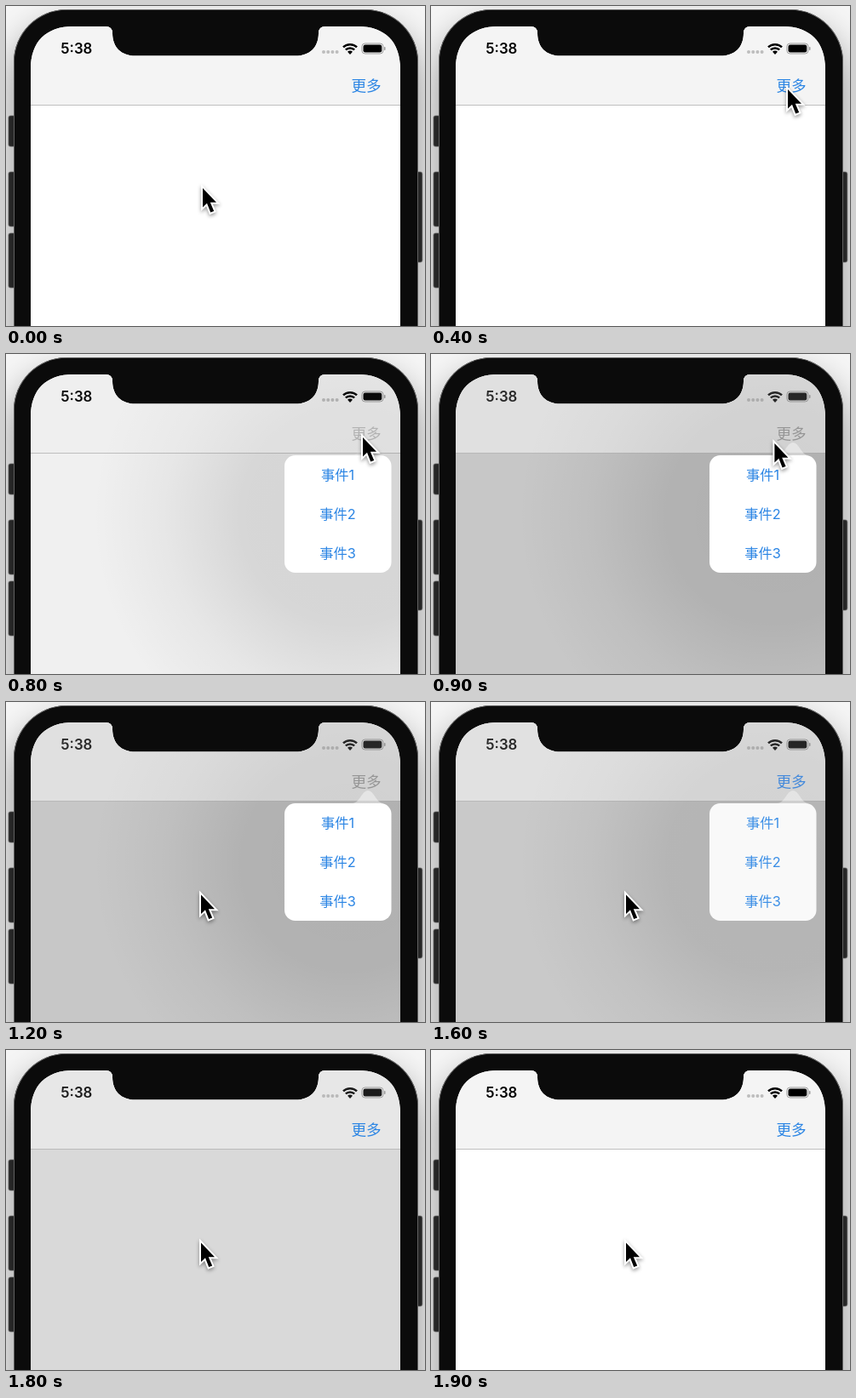
An HTML page with a canvas that plays this animation: 492x376 px, repeating every 2 s.

```html
<!DOCTYPE html>
<html lang="zh-CN">
<head>
<meta charset="utf-8">
<title>Popover menu</title>
<style>
html, body { margin: 0; width: 100%; height: 100%; overflow: hidden; background: #f4f4f4; }
canvas { display: block; }
</style>
</head>
<body>
<canvas id="stage" width="492" height="376"></canvas>
<script>
const ctx = document.getElementById('stage').getContext('2d');
const LOOP = 2000, STEP = 100;
const FONT = 'Inter, "Noto Sans CJK SC", "Noto Sans CJK", sans-serif';
const BLUE = '#2b85e4';

// Each track holds [start ms, value]; values change in hard steps.
const dimTrack = [[0, 0], [800, .27], [900, 1], [1600, .97], [1700, .87], [1800, .68], [1900, 0]];
const menuTrack = [[0, 0], [800, 1], [1600, .92], [1700, .45], [1800, 0]];
const buttonTrack = [[0, BLUE], [700, '#c3daf2'], [800, '#b2b2b2'], [900, '#959595'],
  [1600, '#4389db'], [1700, '#3687e0'], [1800, BLUE]];
const cursorTrack = [[0, [231, 214]], [200, [262, 193]], [300, [368, 126]], [400, [419, 98]],
  [900, [403.4, 105]], [1000, [343, 146]], [1100, [269, 200]], [1200, [229, 226.5]]];

const valueAt = (track, t) => track.reduce((v, key) => t >= key[0] ? key[1] : v, track[0][1]);

function box(x, y, w, h, r, color) {
  ctx.beginPath();
  ctx.roundRect(x, y, w, h, r);
  ctx.fillStyle = color;
  ctx.fill();
}

function rimmedBox(x, y, w, h, r, color) {
  box(x, y, w, h, r, '#777');
  box(x + .8, y + .8, w - 1.6, h - 1.6, r - .8, color);
}

function rect(x, y, w, h, color) {
  ctx.fillStyle = color;
  ctx.fillRect(x, y, w, h);
}

function label(text, x, y, size, color, weight = 400, align = 'center') {
  ctx.font = `${weight} ${size}px ${FONT}`;
  ctx.textAlign = align;
  ctx.fillStyle = color;
  ctx.fillText(text, x, y);
}

function drawDevice() {
  rect(0, 0, 492, 376, '#f6f6f6');
  ctx.save();
  ctx.shadowColor = 'rgba(0,0,0,.42)';
  ctx.shadowBlur = 44;
  ctx.shadowOffsetY = 22;
  box(9, 4, 475, 520, 62, '#0b0b0b');
  ctx.restore();
  for (const [x, y, h] of [[2.5, 128.5, 37], [2.5, 194.5, 65], [2.5, 266.5, 65], [480, 194.5, 107]])
    rimmedBox(x, y, 9.3, h, 3, '#262626');
  rimmedBox(9, 4, 475, 520, 62, '#0b0b0b');
}

function screenPath() {
  ctx.beginPath();
  ctx.moveTo(29, 376);
  ctx.lineTo(29, 74);
  ctx.bezierCurveTo(29, 42, 47, 24, 79, 24);
  ctx.lineTo(117, 24);
  ctx.quadraticCurveTo(125, 24, 125, 32);
  ctx.bezierCurveTo(125, 49, 136, 58.6, 152, 58.6);
  ctx.lineTo(340, 58.6);
  ctx.bezierCurveTo(356, 58.6, 367, 49, 367, 32);
  ctx.quadraticCurveTo(367, 24, 375, 24);
  ctx.lineTo(413, 24);
  ctx.bezierCurveTo(445, 24, 463, 42, 463, 74);
  ctx.lineTo(463, 376);
  ctx.closePath();
}

function drawWifi() {
  ctx.save();
  ctx.beginPath();
  ctx.moveTo(404, 57);
  ctx.lineTo(392, 44);
  ctx.lineTo(392, 38);
  ctx.lineTo(416, 38);
  ctx.lineTo(416, 44);
  ctx.closePath();
  ctx.clip();
  ctx.strokeStyle = ctx.fillStyle = '#000';
  ctx.lineWidth = 2.5;
  for (const r of [11.8, 7.6]) {
    ctx.beginPath();
    ctx.arc(404, 57, r, Math.PI, 0);
    ctx.stroke();
  }
  ctx.beginPath();
  ctx.arc(404, 57, 4.4, Math.PI, 0);
  ctx.fill();
  ctx.restore();
}

function drawStatus() {
  label('5:38', 64.3, 56.4, 16.8, '#000', 600, 'left');
  for (let i = 0; i < 4; i++) box(371 + i * 5.2, 52, 4, 4, 2, '#bdbdbd');
  drawWifi();
  ctx.beginPath();
  ctx.roundRect(417.9, 44, 25, 12, 3.6);
  ctx.strokeStyle = '#9b9b9b';
  ctx.lineWidth = 1;
  ctx.stroke();
  box(419.5, 45.6, 21.8, 8.8, 2.2, '#000');
  box(444, 48, 1.5, 4, 1, '#9b9b9b');
}

function drawShade(dim, menu) {
  rect(29, 24, 434, 93, `rgba(165,165,165,${.25 * dim})`);
  rect(29, 117, 434, 259, `rgba(0,0,0,${.22 * dim})`);
  if (!menu) return;
  const glow = ctx.createRadialGradient(402, 190, 0, 402, 190, 300);
  glow.addColorStop(0, `rgba(0,0,0,${.115 * menu})`);
  glow.addColorStop(.42, `rgba(0,0,0,${.105 * menu})`);
  glow.addColorStop(.72, `rgba(0,0,0,${.04 * menu})`);
  glow.addColorStop(1, 'rgba(0,0,0,0)');
  ctx.globalAlpha = .6;
  rect(29, 24, 434, 93, glow);
  ctx.globalAlpha = 1;
  rect(29, 117, 434, 259, glow);
}

function drawMenu(dim, menu) {
  ctx.save();
  ctx.globalAlpha = menu;
  ctx.beginPath();
  ctx.moveTo(407, 119);
  ctx.bezierCurveTo(415, 119, 418, 104, 425, 104);
  ctx.bezierCurveTo(432, 104, 435, 119, 443, 119);
  ctx.fillStyle = `rgba(255,255,255,${.42 * dim})`;
  ctx.fill();
  box(327, 119, 125.5, 138, 12.5, '#fff');
  for (let i = 0; i < 3; i++)
    label('事件' + (i + 1), 389.5, 148 + 46 * i, 16.3, BLUE);
  ctx.restore();
}

function drawCursor([x, y]) {
  ctx.save();
  ctx.translate(x, y);
  const arrow = new Path2D('M0 0V22.5L5 17.8L9.2 28.6L13.2 27L8.8 16.8H16Z');
  ctx.lineWidth = 4;
  ctx.strokeStyle = '#fff';
  ctx.shadowColor = 'rgba(0,0,0,.4)';
  ctx.shadowBlur = 4;
  ctx.shadowOffsetY = 2;
  ctx.stroke(arrow);
  ctx.shadowColor = 'transparent';
  ctx.fillStyle = '#000';
  ctx.fill(arrow);
  ctx.restore();
}

function draw(now) {
  const t = Math.floor((now % LOOP) / STEP) * STEP;
  const dim = valueAt(dimTrack, t), menu = valueAt(menuTrack, t);
  drawDevice();
  ctx.save();
  screenPath();
  ctx.clip();
  rect(29, 24, 434, 352, '#fff');
  rect(29, 24, 434, 92, '#f4f4f4');
  rect(29, 116, 434, 1, '#bfbfbf');
  drawStatus();
  drawShade(dim, menu);
  label('更多', 423, 100, 17.6, valueAt(buttonTrack, t));
  if (menu) drawMenu(dim, menu);
  ctx.restore();
  drawCursor(valueAt(cursorTrack, t));
}

const start = performance.now();
function tick() {
  draw(performance.now() - start);
  requestAnimationFrame(tick);
}
tick();
</script>
</body>
</html>
```
